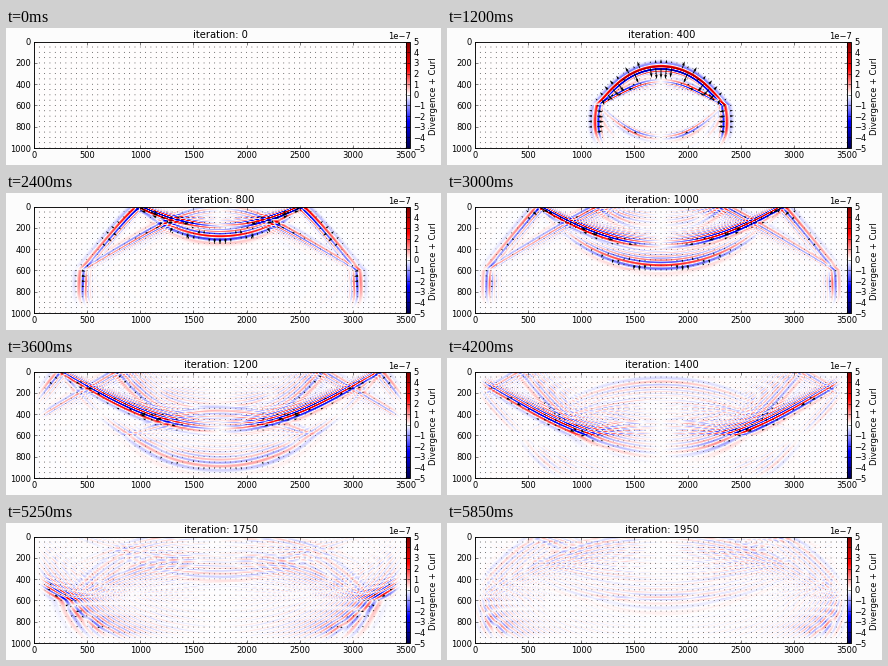
A matplotlib script for the animation above (6 s loop, 435 by 137 pixels).

```python
import numpy as np
import matplotlib.pyplot as plt
from matplotlib.animation import FuncAnimation

# Stage
W, H, DPI = 435, 137, 64
FRAMES, INTERVAL, ITERS = 40, 150, 50

# Elastic two-layer model on a second-order staggered grid, one step per
# iteration. Only the right half is solved, the left is mirrored.
STEP = 5.0
NZ, NX = 201, 351
INTERFACE = 600
UPPER, LOWER = (1.38, 0.92, 1.0), (1.775, 1.24, 1.6)   # P, S, density
SOURCE_ROW = 150
PULSE_TIME, PULSE_WIDTH = 50.0, 10.0
SPONGE = 36
INNER = (slice(1, -1), slice(1, -1))


def layered(depth):
    """Lame parameters and density as columns over depth."""
    below = depth >= INTERFACE
    vp, vs, rho = (np.where(below, b, a) for a, b in zip(UPPER, LOWER))
    mu = rho * vs ** 2
    lam = rho * vp ** 2 - 2 * mu
    return [a.astype(np.float32)[:, None] for a in (lam, mu, rho)]


def sponge():
    row = np.clip(np.arange(NZ) - (NZ - 1 - SPONGE), 0, None) / SPONGE
    col = np.clip(np.arange(NX) - (NX - 1 - SPONGE), 0, None) / SPONGE
    loss = row[:, None] ** 2 + col[None, :] ** 2
    return np.exp(-0.07 * loss).astype(np.float32)


def diff(a, axis, back):
    """Staggered derivative, half a cell ahead or back."""
    def shift(k):
        cut = [slice(1, -1), slice(1, -1)]
        cut[axis] = slice(1 + k, a.shape[axis] - 1 + k)
        return a[tuple(cut)]
    s = -1 if back else 0
    return (shift(s + 1) - shift(s)) * np.float32(1 / STEP)


def pulse(t):
    u = (t - PULSE_TIME) / PULSE_WIDTH
    return -np.exp(-u * u / 2) * (0.4 - u)


def unfold(half, sign):
    return np.hstack([sign * half[:, :0:-1], half])


def simulate():
    """Return the divergence + curl image and the velocities per frame."""
    depth = np.arange(NZ) * STEP
    lam, mu, rho = layered(depth)
    _, mu_half, rho_half = layered(depth + STEP / 2)
    stiff = lam + 2 * mu
    damp = sponge()
    vx, vz, xx, zz, xz = (np.zeros((NZ + 2, NX + 2), np.float32)
                          for _ in range(5))

    def strain():
        ex, ez = diff(vx, 1, True), diff(vz, 0, True)
        ez[0] = -lam[0] / stiff[0] * ex[0]
        return ex, ez

    def snapshot():
        ex, ez = strain()
        curl = diff(vz, 1, False) - diff(vx, 0, False)
        node = np.zeros_like(curl)
        node[:, 1:] = (curl[:, 1:] + curl[:, :-1]) / 2
        field = unfold(ex + ez, 1) + unfold(node, -1)
        u = (vx[1:-1, 1:-1] + vx[1:-1, :-2]) / 2
        return (field, unfold(u, -1)[::10, ::10],
                unfold(vz[INNER], 1)[::10, ::10])

    shots = [snapshot()]
    for n in range(1, (FRAMES - 1) * ITERS + 1):
        ex, ez = strain()
        xx[INNER] += stiff * ex + lam * ez
        zz[INNER] += lam * ex + stiff * ez
        xz[INNER] += mu_half * (diff(vx, 0, False) + diff(vz, 1, False))
        xx[SOURCE_ROW + 1, 1] += pulse(n)
        zz[SOURCE_ROW + 1, 1] += pulse(n)
        for a in (xx, zz, xz):
            a[INNER] *= damp
        # free surface on top, symmetry axis on the left
        zz[1] = 0
        zz[0], xz[0] = -zz[2], -xz[1]
        xx[:, 0], zz[:, 0], xz[:, 0] = xx[:, 2], zz[:, 2], -xz[:, 1]

        vx[INNER] += (diff(xx, 1, False) + diff(xz, 0, True)) / rho
        vz[INNER] += (diff(xz, 1, True) + diff(zz, 0, False)) / rho_half
        for a in (vx, vz):
            a[INNER] *= damp
        vx[:, 0], vz[:, 0] = -vx[:, 1], vz[:, 2]
        if n % ITERS == 0:
            shots.append(snapshot())
    return shots


shots = simulate()
ref_field, ref_u, ref_v = shots[8]
field_gain = 4.5 / np.abs(ref_field[36:64, NX - 1]).max()
arrow_gain = 11 / np.hypot(ref_u, ref_v).max()


def pt(pixels):
    return pixels * 72 / DPI


def add_axes(x0, y0, x1, y1):
    return fig.add_axes([x0 / W, 1 - y1 / H, (x1 - x0) / W, (y1 - y0) / H])


plt.rcParams.update({"font.family": "DejaVu Sans", "font.size": pt(8.33),
                     "axes.linewidth": pt(0.9)})
fig = plt.figure(figsize=(W / DPI, H / DPI), dpi=DPI, facecolor="#fcfcfc")
ax = add_axes(28, 13.7, 400, 120)
image = ax.imshow(shots[0][0], cmap="seismic", vmin=-5, vmax=5,
                  extent=(0, 3500, 1000, 0), aspect="auto")
gx, gy = np.meshgrid(np.arange(0, 3501, 50), np.arange(0, 1001, 50))
arrows = ax.quiver(gx, gy, shots[0][1], shots[0][2], units="dots",
                   scale_units="dots", scale=1, width=0.9, color="black")
ax.set_xlim(0, 3500)
ax.set_ylim(1000, 0)
ax.set_xticks(range(0, 3501, 500))
ax.set_yticks(range(0, 1001, 200))
ax.tick_params(direction="in", top=True, right=True, length=pt(3),
               width=pt(0.5), pad=pt(3))

bar_ax = add_axes(400, 13.7, 404, 120)
bar = fig.colorbar(image, cax=bar_ax, ticks=range(-5, 6))
bar.outline.set_linewidth(pt(0.9))
bar_ax.tick_params(direction="in", length=pt(3), width=pt(0.5), pad=pt(3.5))


def label(x, y, text, **style):
    return fig.text(x / W, 1 - y / H, text, **style)


title = label(214.5, 10.2, "", size=pt(10), ha="center", va="baseline")
label(404.5, 11.2, "1e\u22127", ha="right", va="baseline")
label(427.5, 68, "Divergence + Curl", rotation=90, ha="center", va="center")


def draw(frame):
    field, u, v = shots[frame]
    image.set_data(field * field_gain)
    arrows.set_UVC(u * arrow_gain, -v * arrow_gain)
    title.set_text(f"iteration: {frame * ITERS}")
    return image, arrows, title


anim = FuncAnimation(fig, draw, frames=FRAMES, interval=INTERVAL,
                     repeat=True, repeat_delay=0, blit=False)
plt.show()
```
